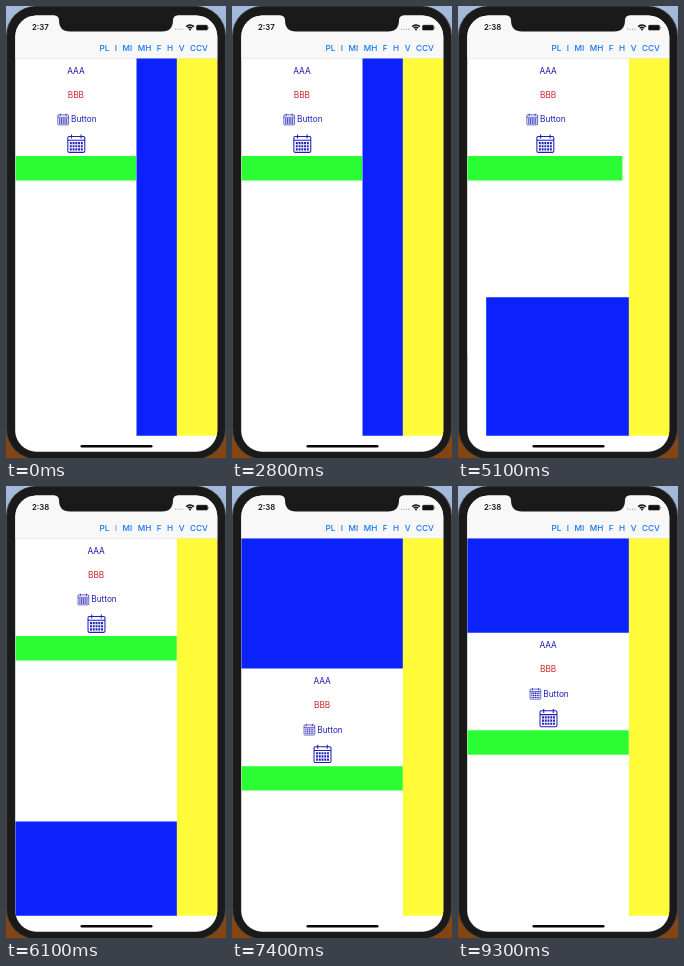
Animation, 220 px wide and 452 px high, one loop 9.4 s. Source, as an HTML page with a canvas:

```html
<!DOCTYPE html>
<html lang="en">
<head>
<meta charset="utf-8">
<title>Split panes</title>
<style>
  html, body { margin: 0; width: 100%; height: 100%; overflow: hidden; }
  canvas { display: block; }
</style>
</head>
<body>
<canvas id="stage" width="220" height="452"></canvas>
<script>
const ctx = document.getElementById('stage').getContext('2d');
const LOOP = 9400, DURATION = 500, PRESS = 150;
const INK = '#1e1eb4', BEZEL = '#1a1a1a';

// Split area, and the menu's row height
const LEFT = 9.3, TOP = 52.4, WIDTH = 161.6, HEIGHT = 377.3, ROW = 24.4;

// Pane rectangles as [x, y, width, height], each a share of the split area
const pane = (x, y, w, h) => [LEFT + x * WIDTH, TOP + y * HEIGHT, w * WIDTH, h * HEIGHT];
const poses = {
  wide:   { menu: pane(0, 0, 0.75, 1),    blue: pane(0.75, 0, 0.25, 1) },
  narrow: { menu: pane(0, 0, 0.25, 1),    blue: pane(0.25, 0, 0.75, 1) },
  stack:  { menu: pane(0, 0, 1, 0.75),    blue: pane(0, 0.75, 1, 0.25) },
  low:    { menu: pane(0, 0.25, 1, 0.75), blue: pane(0, 0, 1, 0.25) },
  bottom: { menu: pane(0, 0.75, 1, 0.25), blue: pane(0, 0, 1, 0.75) }
};

const steps = [
  [450, 'narrow', 'F'], [2200, 'wide', 'F'], [4738, 'stack', 'V'],
  [6141, 'low', 'I'], [7250, 'bottom', 'F'], [8600, 'low', 'F']
];

const navItems = [['PL', 93.5], ['I', 108.7], ['MI', 116.5], ['MH', 131.7],
  ['F', 150.7], ['H', 161], ['V', 172.8], ['CCV', 184]];

function easeInOut(x) {
  let lo = 0, hi = 1;
  for (let i = 0; i < 20; i++) {
    const s = (lo + hi) / 2, r = 1 - s;
    if (1.26 * r * r * s + 1.74 * r * s * s + s * s * s < x) lo = s; else hi = s;
  }
  return lo * lo * (3 - 2 * lo);
}

const mix = (a, b, k) => a.map((v, i) => v + (b[i] - v) * k);

function fill(color, x, y, w, h, r = 0) {
  ctx.fillStyle = color;
  ctx.beginPath();
  ctx.roundRect(x, y, w, h, r);
  ctx.fill();
}

function text(str, x, y, color, align = 'left', size = 8.3, weight = 400) {
  ctx.font = `${weight} ${size}px Inter, sans-serif`;
  ctx.textAlign = align;
  ctx.fillStyle = color;
  ctx.fillText(str, x, y + size * 0.365);
}

function calendar(x, y, size) {
  const u = size / 17;
  ctx.save();
  ctx.translate(x, y);
  ctx.scale(u, u);
  ctx.strokeStyle = INK;
  ctx.lineWidth = 1;
  ctx.beginPath();
  ctx.roundRect(0.5, 1.8, 16, 15, 1.2);
  ctx.moveTo(0.5, 5.4);
  ctx.lineTo(16.5, 5.4);
  for (const ring of [4, 13]) {
    ctx.moveTo(ring, 0);
    ctx.lineTo(ring, 3.8);
  }
  ctx.stroke();
  for (let row = 0; row < 3; row++)
    for (let col = 0; col < 5; col++)
      fill(INK, 2.4 + col * 2.6, 7 + row * 3, 1.8, 2);
  ctx.restore();
}

function drawMenu([x, y, w, h], target) {
  const mid = x + w / 2;
  const labelX = x + target[2] / 2; // labels take their new layout at once
  const short = target[2] < 60;
  const rowMid = row => y + (row + 0.5) * ROW;
  ctx.save();
  ctx.beginPath();
  ctx.rect(x, y, w, h);
  ctx.clip();
  fill('#fff', x, y, w, h);
  text('AAA', labelX, rowMid(0), INK, 'center');
  text('BBB', labelX, rowMid(1), '#cc242a', 'center');
  const left = mid - (short ? 16.2 : 18.4);
  calendar(left, rowMid(2) - 5.8, 11.4);
  text(short ? 'B...on' : 'Button', left + 13.5, rowMid(2), INK);
  calendar(mid - 8.6, rowMid(3) - 9.2, 18);
  fill('#2bfd34', x, y + 4 * ROW, w, ROW);
  ctx.restore();
}

function drawStatus(t) {
  text(t < 3500 ? '2:37' : '2:38', 26, 21.5, '#111', 'left', 7.8, 600);
  for (let i = 0; i < 4; i++) fill('#aaa', 169 + i * 2.4, 22.6, 1.3, 1.3, 0.65);
  ctx.strokeStyle = '#111';
  ctx.lineWidth = 1.5;
  for (const r of [3, 5.2]) {
    ctx.beginPath();
    ctx.arc(184, 24.2, r, -Math.PI * 0.76, -Math.PI * 0.24);
    ctx.stroke();
  }
  fill('#111', 183, 22.5, 2, 2, 1);
  fill('#777', 190, 18.8, 12, 5.8, 1.6);
  fill('#111', 190.6, 19.3, 10.8, 4.8, 1.2);
  fill('#777', 202.4, 20.7, 0.8, 2);
}

function drawPhone() {
  const wallpaper = ctx.createLinearGradient(0, 0, 0, 452);
  wallpaper.addColorStop(0, '#a4bbdc');
  wallpaper.addColorStop(0.5, '#777b88');
  wallpaper.addColorStop(1, '#854310');
  fill(wallpaper, 0, 0, 220, 452);
  fill('#444', 0, 0, 220, 453, 30);
  fill(BEZEL, 1, 0.5, 218, 452, 29);
}

function drawNotch() {
  ctx.fillStyle = BEZEL;
  ctx.beginPath();
  ctx.moveTo(48, 9);
  ctx.quadraticCurveTo(53, 10, 53, 14);
  ctx.quadraticCurveTo(53, 25.5, 64, 25.5);
  ctx.lineTo(156, 25.5);
  ctx.quadraticCurveTo(167, 25.5, 167, 14);
  ctx.quadraticCurveTo(167, 10, 172, 9);
  ctx.fill();
}

function draw(t) {
  let from = poses.wide, to = poses.wide, k = 1, pressed = '';
  for (const [start, pose, button] of steps) {
    if (t >= start - PRESS && t < start) pressed = button;
    if (t < start) continue;
    from = to;
    to = poses[pose];
    k = easeInOut(Math.min(1, (t - start) / DURATION));
  }

  drawPhone();
  ctx.save();
  ctx.beginPath();
  ctx.roundRect(LEFT, 9.5, 202, 436.2, 21);
  ctx.clip();
  fill('#fff', 9, 9, 203, 437);
  fill('#f8f8f8', 9, 9, 203, TOP - 9);
  fill('#cfcfcf', 9, TOP - 0.5, 203, 0.5);
  drawMenu(mix(from.menu, to.menu, k), to.menu);
  fill('#0b22fc', ...mix(from.blue, to.blue, k));
  fill('#fffb38', LEFT + WIDTH, TOP, 41, HEIGHT);
  for (const [label, x] of navItems)
    text(label, x, 42, label === pressed ? '#6da3dc' : '#0f75ee', 'left', 8.2, 500);
  drawStatus(t);
  fill('#050505', 74.5, 439, 72, 2.6, 1.3);
  ctx.restore();
  drawNotch();
}

function tick() {
  draw(performance.now() % LOOP);
  requestAnimationFrame(tick);
}
tick();
</script>
</body>
</html>
```
